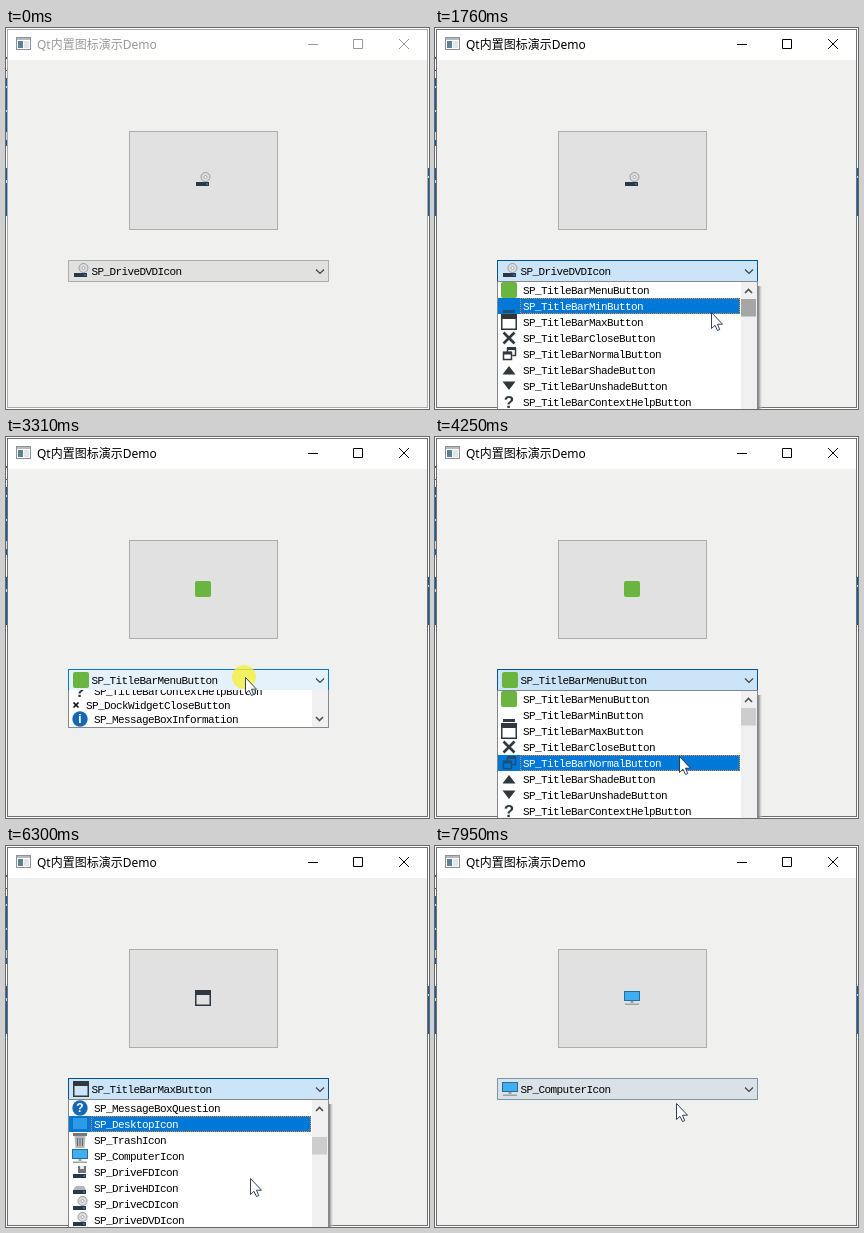
An HTML page that plays this animation: 423 by 381 pixels, repeating every 8000 ms.

```html
<!DOCTYPE html>
<html lang="zh">
<head>
<meta charset="utf-8">
<title>Icon demo</title>
<style>
html, body { margin: 0; width: 100%; height: 100%; overflow: hidden; background: #fff; }
#stage { display: block; width: 423px; height: 381px; }
.mono { font: 11px "Liberation Mono", monospace; letter-spacing: -.6px; }
.title { font: 12px "Noto Sans", "Noto Sans CJK SC", "Noto Sans CJK JP", sans-serif; }
.mark { font: bold 17px "Liberation Sans", sans-serif; text-anchor: middle; }
.badge { font: bold 12px "Liberation Sans", sans-serif; text-anchor: middle; fill: #fff; }
</style>
</head>
<body>
<svg id="stage" viewBox="0 0 423 381">
  <defs id="icons">
    <linearGradient id="fade"><stop stop-color="#777"/><stop offset="1" stop-color="#ddd" stop-opacity=".3"/></linearGradient>
    <clipPath id="roll"><rect id="rollBox" x="62" y="253" width="261" height="0"/></clipPath>
  </defs>

  <!-- desktop behind the window -->
  <path d="M0 50h2v68h-2zM0 140h2v48h-2zM421 140h2v48h-2z" fill="#0b5fa8"/>
  <path d="M0 29h1v2h-1zM0 42h2v1h-2z" fill="#555"/>
  <path d="M0 58h1v2h-1zM0 82h1v2h-1zM0 104h1v8h-1zM0 152h1v3h-1zM422 148h1v2h-1z" fill="#c9dcea"/>

  <!-- window -->
  <rect id="frame" x="1.5" y="1.5" width="420" height="378" fill="#f0f0ee"/>
  <path d="M2 2h419v30h-419z" fill="#fff"/>
  <rect x="10.5" y="9.5" width="14" height="12" fill="#fff" stroke="#8b9196"/>
  <path d="M11 10h13v2h-13z" fill="#b4babe"/>
  <path d="M12 13h5v7h-5z" fill="#5b8195"/>
  <path d="M18 13h5v7h-5z" fill="#e2e6e8"/>
  <g id="caption">
    <text class="title" x="31" y="21">Qt内置图标演示Demo</text>
    <path d="M302 16.5h10M347.5 11.5h9v9h-9zM393 11l10 10M403 11l-10 10" fill="none" stroke="currentColor"/>
  </g>
  <rect x="123.5" y="103.5" width="148" height="98" fill="#e1e1e1" stroke="#adadad"/>
  <use id="bigIcon" x="189" y="144"/>

  <!-- combo box -->
  <rect id="combo" x="62.5" y="232.5" width="260" height="21"/>
  <use id="comboIcon" x="67" y="235"/>
  <text id="comboText" class="mono" x="85.5" y="247"/>
  <path d="M310 241.5l4 4 4-4" fill="none" stroke="#3c3c3c" stroke-width="1.1"/>

  <!-- popup list -->
  <rect id="shadow" x="323" y="258" width="4" height="123" fill="url(#fade)"/>
  <g clip-path="url(#roll)">
    <g id="panel">
      <rect x="62.5" y="253.5" width="260" height="157" fill="#fff" stroke="#828790"/>
      <svg x="63" y="254" width="243" height="156"><g id="list">
        <g id="bar"><path d="M0 0h242v16h-242z" fill="#0078d7"/></g>
        <g id="rows"></g>
        <g id="focus">
          <path d="M0 0h22v16h-22z" fill="#0078d7" opacity=".35"/>
          <rect x="22.5" y=".5" width="219" height="15" fill="none" stroke="#ff8728" stroke-dasharray="1" stroke-dashoffset=".5"/>
        </g>
      </g></svg>
      <path d="M306 254h16v156h-16z" fill="#f0f0f0"/>
      <rect id="thumb" x="306" width="15" height="17.5"/>
      <path d="M310 265l3.5-3.5 3.500 3.500M310 400l3.500 3.500 3.500-3.500" fill="none" stroke="#505050" stroke-width="1.600"/>
    </g>
  </g>

  <circle id="press" r="12" fill="#f6f03c" opacity=".8"/>
  <path id="cursor" d="M.5 .5V16.500L4 13.300 6.500 18.500 8.700 17.600 6.500 12.200H11.500Z" fill="#fff" stroke="#1d2e48" stroke-width=".9"/>
</svg>
<script>
const LOOP = 8000, ROLL = 150, PANEL = 158, FADE = 350;
const LIST_TOP = 254, ROW = 16, SMALL = 8;         // the SMALL row is 4px lower than the rest
const $ = id => document.getElementById(id);
const set = (id, attrs) => { for (const k in attrs) $(id).setAttribute(k, attrs[k]); };
const clamp = (v, max = 1) => Math.min(max, Math.max(0, v));
const ease = p => (1 - Math.cos(Math.PI * p)) / 2;
const mix = (a, b, p) => a.map((v, i) => v + (b[i] - v) * p);
const show = on => on ? 'visible' : 'hidden';

const INK = '#30373d';
const path = (d, fill) => `<path d="${d}" fill="${fill}"/>`;
const line = (d, color, width) => `<path d="${d}" fill="none" stroke="${color}" stroke-width="${width}"/>`;
const badge = ch => `<circle cx="8" cy="8" r="7.7" fill="#1668b5"/><text class="badge" x="8" y="12.3">${ch}</text>`;
const drive = top => top + path('M1 10h13v4h-13z', '#26384a') + path('M11 11.5h2v1h-2z', '#3f9be0');
const disc = drive('<circle cx="10.5" cy="5" r="4.5" fill="#dcdedf" stroke="#999da0"/><circle cx="10.5" cy="5" r="1.5" fill="#fff" stroke="#999da0" stroke-width=".8"/>');
const disk = drive(path('M4 6h8l2 4h-13z', '#b2b7bb'));
const screen = h => path(`M0 1h16v${h}h-16z`, '#246e9f') + path(`M1 2h14v${h - 2}h-14z`, '#42aef2');

const ICONS = {
  TitleBarMenuButton: '<rect width="16" height="16" rx="2" fill="#69b53f"/>',
  TitleBarMinButton: path('M2 12h12v3h-12z', INK),
  TitleBarMaxButton: path('M0 0h16v16h-16zM1.5 5v9.5h13v-9.5z', INK),
  TitleBarCloseButton: line('M2.5 2.5l11 11M13.5 2.5l-11 11', INK, 2.6),
  TitleBarNormalButton: line('M6.5 6v-3.5h8v7h-3M2.5 6.5h8v7h-8z', INK, 1.5) + path('M6 1h9v3h-9zM2 5.5h9v3h-9z', INK),
  TitleBarShadeButton: path('M8 4l6.500 8.500h-13z', INK),
  TitleBarUnshadeButton: path('M8 12l6.500-8.500h-13z', INK),
  TitleBarContextHelpButton: `<text class="mark" x="8" y="14" fill="${INK}">?</text>`,
  DockWidgetCloseButton: line('M1.5 3.5l5 5M6.5 3.5l-5 5', '#111', 1.7),
  MessageBoxInformation: badge('i'),
  MessageBoxWarning: path('M8 1l8 14h-16z', '#f0b429') + path('M7 6h2v5h-2zM7 12h2v2h-2z', '#333'),
  MessageBoxCritical: '<circle cx="8" cy="8" r="7.7" fill="#d13438"/>' + line('M5 5l6 6M11 5l-6 6', '#fff', 2),
  MessageBoxQuestion: badge('?'),
  DesktopIcon: screen(13),
  TrashIcon: path('M1 1h14v3h-14z', '#777') + path('M2.5 4h11l-1 12h-9z', '#b5b8ba') + line('M5.5 6v8M8 6v8M10.5 6v8', '#666', 1),
  ComputerIcon: screen(10) + path('M6.5 11h3v2h-3zM1 13.5h14v1.5h-14z', '#98a3aa'),
  DriveFDIcon: drive(path('M6 2h8v7h-8z', '#6d747a') + path('M8 2h4v3h-4z', '#e8e8e8')),
  DriveHDIcon: disk,
  DriveCDIcon: disc,
  DriveDVDIcon: disc,
  DriveNetIcon: disk,
  DirOpenIcon: path('M1 3h5l2 2h7v9h-14z', '#e9b44a')
};
const NAMES = Object.keys(ICONS);
const rowY = i => i * ROW - (i > SMALL ? 4 : 0);

NAMES.forEach((name, i) => {
  const [x, y] = i === SMALL ? [17, 10] : [25, 12];
  $('icons').insertAdjacentHTML('beforeend', `<g id="icon${i}">${ICONS[name]}</g>`);
  $('rows').insertAdjacentHTML('beforeend',
    `<use href="#icon${i}" x="3" y="${rowY(i)}"/><text class="mono" x="${x}" y="${rowY(i) + y}">SP_${name}</text>`);
});
const rowTexts = $('rows').querySelectorAll(':scope > text');

// mouse moves: begin, end, x, y
const MOVES = [
  [0, 50, 430, 190], [50, 380, 312, 242], [870, 940, 318, 298], [950, 1110, 320, 276],
  [1120, 1260, 304, 296], [1759, 1760, 276, 284], [1760, 1950, 252, 275], [2090, 2210, 242, 263],
  [2500, 2950, 239, 240], [3520, 3950, 246, 326], [4249, 4250, 244, 319], [4250, 4390, 241, 290],
  [4900, 5330, 248, 244], [5880, 6020, 244, 332], [6210, 6240, 244, 332], [6860, 7440, 241, 308],
  [7740, 7950, 241, 257]
];
// each time the list is used: opens, press on a row, closes
const ROUNDS = [[520, 2350, 2400], [3275, 4640, 4820], [5720, 7640, 7720]]
  .map(([open, press, close]) => ({ open, press, close }));
const DRAG = 950;                                  // grabs the scroll thumb
const WHEEL = 5980;                                // then three rows per notch

const moveAt = t => MOVES.findLastIndex(m => m[0] <= t);
function cursorAt(t) {
  const n = moveAt(t), [a, b, ...to] = MOVES[n];
  return mix(MOVES[Math.max(0, n - 1)].slice(2), to, ease(clamp((t - a) / (b - a))));
}
const roundAt = t => ROUNDS.find(r => t >= r.open && t < r.close);
const scrollAt = t => t < ROUNDS[0].close
  ? Math.round(12 * (1 - clamp((t - DRAG) / 160)))
  : 3 * clamp(Math.floor((t - WHEEL) / 75), 4);

// the highlight follows mouse moves only; the wheel leaves it behind
function hoverAt(t, current) {
  const m = Math.min(t, MOVES[moveAt(t)][1]), [x, y] = cursorAt(m);
  if (y < LIST_TOP || x > 305) return current;
  const pos = y - LIST_TOP + rowY(scrollAt(m));
  return NAMES.findLastIndex((_, i) => rowY(i) <= pos);
}
let picked = NAMES.indexOf('DriveDVDIcon');
for (const r of ROUNDS) {
  r.current = picked;
  r.picked = picked = hoverAt(r.close - 1, picked);
}
const choiceAt = t => (ROUNDS.findLast(r => r.close <= t) || { picked: ROUNDS[0].current }).picked;
const pressed = t => t >= DRAG && t < DRAG + 160 ||
  ROUNDS.some(r => t >= r.open - 90 && t < r.open + 60 || t >= r.press && t < r.close + 40);

// fill and border, red green blue each
const IDLE = [225, 225, 225, 173, 173, 173];
const OVER = [229, 241, 251, 0, 120, 215];
const DOWN = [204, 228, 247, 0, 84, 153];
function comboState(t) {
  const r = roundAt(t);
  if (r && t >= r.open + ROLL) return DOWN;
  const [x, y] = cursorAt(Math.max(0, t));
  return x > 62 && x < 323 && y > 232 && y < LIST_TOP ? OVER : IDLE;
}
// averaging the recent states gives the cross-fade
function comboColors(t) {
  const n = 14;
  let sum = IDLE.map(() => 0);
  for (let k = 0; k < n; k++) sum = comboState(Math.max(0, t - k * FADE / n)).map((v, i) => v + sum[i]);
  return sum.map(v => Math.round(v / n));
}

function drawPopup(t) {
  const r = roundAt(t), p = r ? clamp((t - r.open) / ROLL) : 0;
  const h = Math.round(PANEL * p);
  set('rollBox', { height: h });
  set('shadow', { visibility: show(p === 1) });
  if (!r) return;
  const top = scrollAt(t), row = hoverAt(t, r.current), rowShift = `translate(0 ${rowY(row)})`;
  set('panel', { transform: `translate(0 ${h - PANEL})` });
  set('list', { transform: `translate(0 ${-rowY(top)})` });
  set('bar', { transform: rowShift });
  set('focus', { transform: rowShift });
  set('thumb', { y: 271 + top * 5 / 3, fill: r === ROUNDS[0] && t > DRAG ? '#a6a6a6' : '#cdcdcd' });
  rowTexts.forEach((el, i) => { el.style.fill = i === row ? '#fff' : '#000'; });
}

function draw(t) {
  const active = t >= ROUNDS[0].open - 90, icon = '#icon' + choiceAt(t);
  $('caption').style.color = $('caption').style.fill = active ? '#000' : '#999';
  set('frame', { stroke: active ? '#707070' : '#aaa' });
  set('bigIcon', { href: icon });
  set('comboIcon', { href: icon });
  $('comboText').textContent = 'SP_' + NAMES[choiceAt(t)];
  const c = comboColors(t);
  set('combo', { fill: `rgb(${c.slice(0, 3)})`, stroke: `rgb(${c.slice(3)})` });
  drawPopup(t);
  const [x, y] = cursorAt(t).map(Math.round);
  set('cursor', { transform: `translate(${x} ${y})` });
  set('press', { cx: x - 1, cy: y, visibility: show(pressed(t)) });
}

const start = performance.now();
function tick() {
  draw((performance.now() - start) % LOOP);
  requestAnimationFrame(tick);
}
tick();
</script>
</body>
</html>
```
